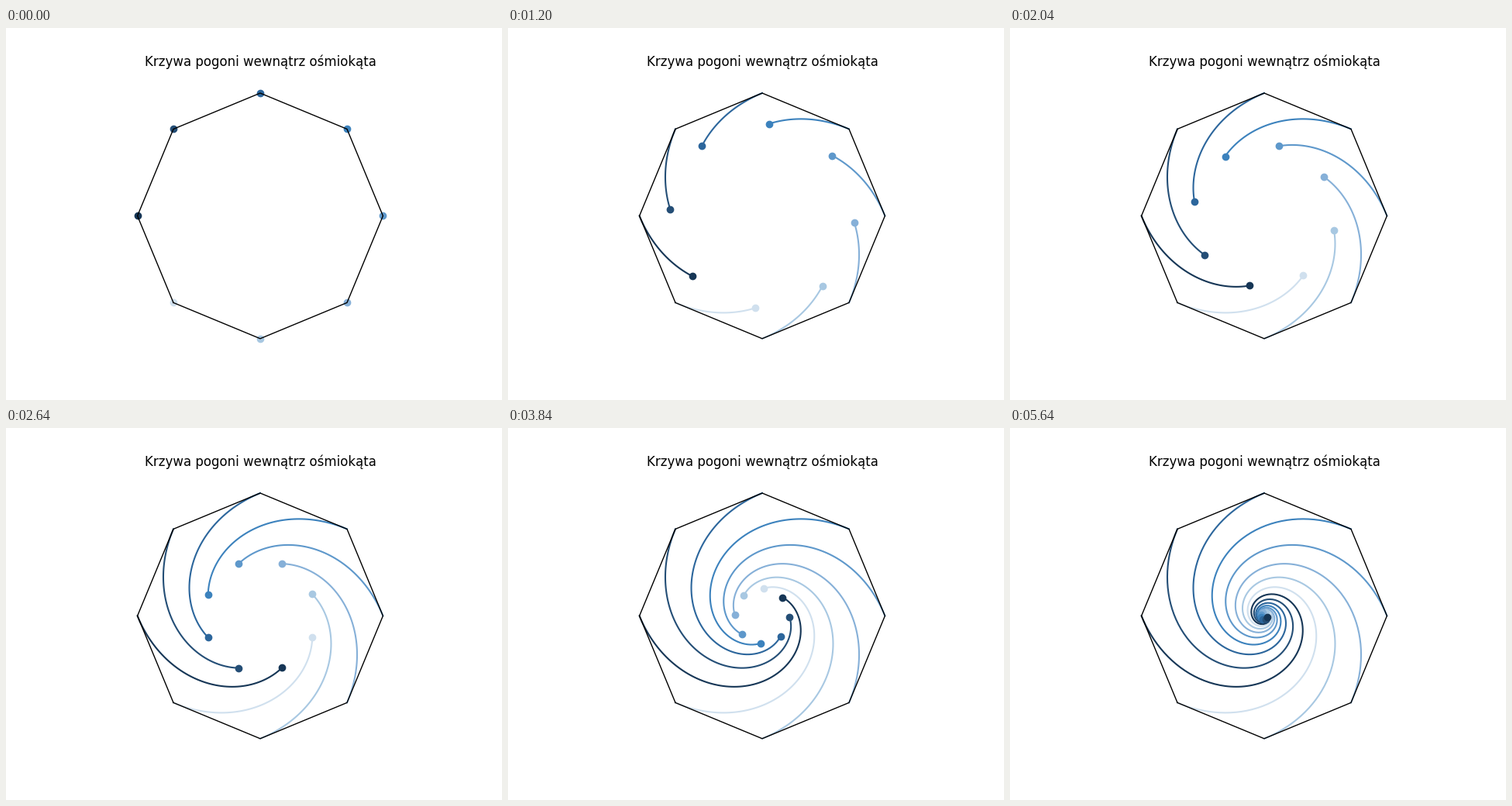
A matplotlib script that plays this animation: 640 by 480 pixels, repeating every 5.68 s.

```python
import numpy as np
import matplotlib.pyplot as plt
from matplotlib.animation import FuncAnimation

SIDES = 8
FRAMES = 142
RADIUS = 0.9
STEP = 0.02
COLORS = ["#d0e0ee", "#a8c8e2", "#86b0d8", "#5e98cb",
          "#3c82bd", "#2c669c", "#244e76", "#163656"]


def pursue(start, steps):
    """Each point moves a fixed distance towards its neighbour per step."""
    path = [start]
    for _ in range(steps - 1):
        pos = path[-1]
        gap = np.roll(pos, -1) - pos
        path.append(pos + STEP * gap / np.abs(gap))
    return np.array(path)


angles = np.radians(225) + 2 * np.pi * np.arange(SIDES) / SIDES
corners = RADIUS * np.exp(1j * angles)
paths = pursue(corners, FRAMES)

fig, ax = plt.subplots(figsize=(6.4, 4.8), dpi=100)
ax.set_aspect("equal")
ax.set_xlim(-1.05, 1.05)
ax.set_ylim(-1.05, 1.05)
ax.axis("off")
ax.set_title("Krzywa pogoni wewnątrz ośmiokąta", fontsize=12,
             fontfamily="DejaVu Sans")

trails = [ax.plot([], [], color=c, lw=1.5)[0] for c in COLORS]
dots = [ax.plot([], [], "o", color=c, ms=6)[0] for c in COLORS]
outline = np.append(corners, corners[0])
ax.plot(outline.real, outline.imag, color="black", lw=1)


def update(frame):
    for trail, dot, path in zip(trails, dots, paths.T):
        done = path[:frame + 1]
        trail.set_data(done.real, done.imag)
        dot.set_data(done.real[-1:], done.imag[-1:])
    return trails + dots


anim = FuncAnimation(fig, update, frames=FRAMES, interval=40,
                     repeat=True, repeat_delay=0)
plt.show()
```
